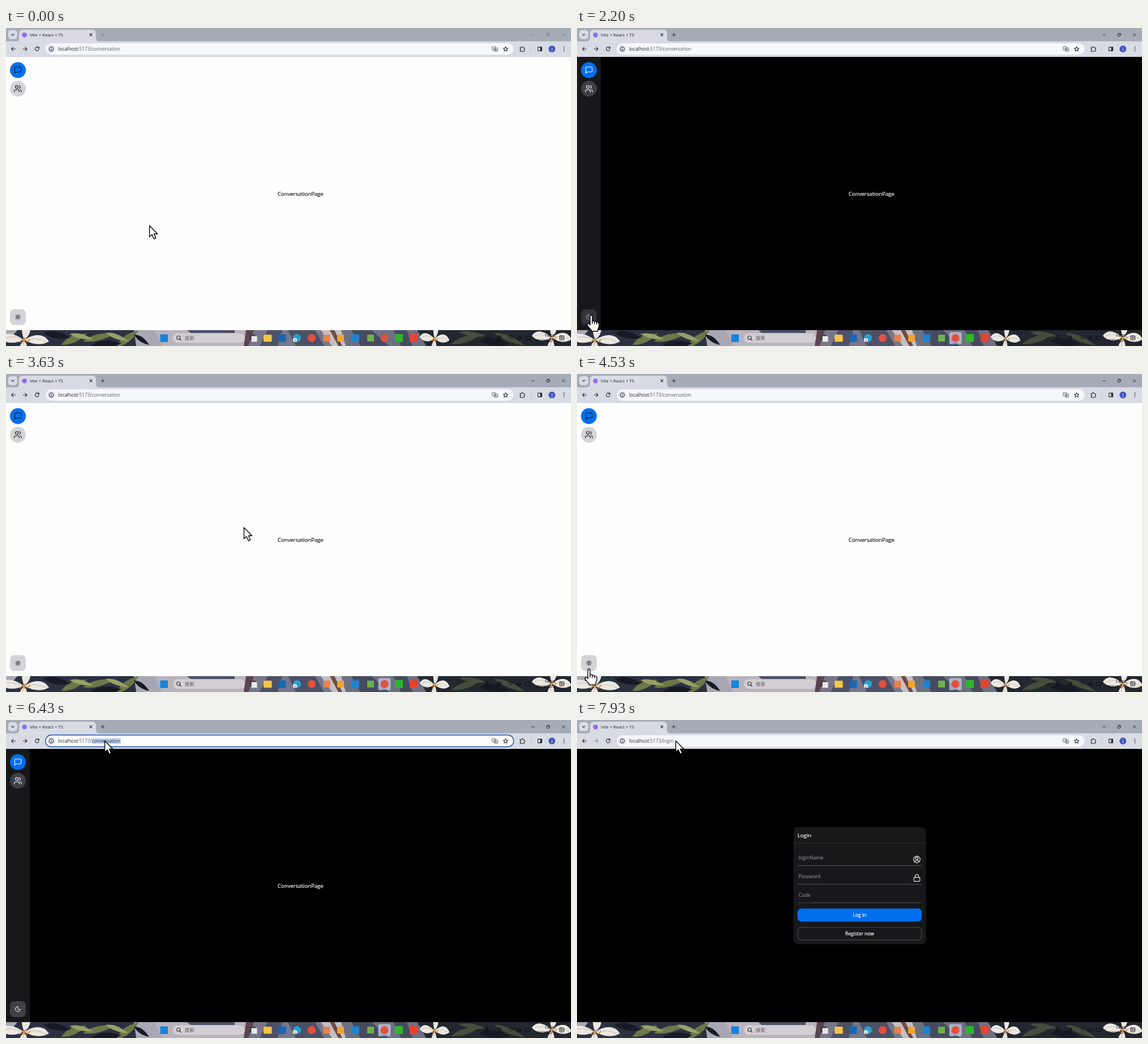
Write an HTML page that moves like this. It is 998 by 561 pixels and loops after 8 s.

```html
<!DOCTYPE html>
<html lang="en">
<head>
<meta charset="utf-8">
<title>Theme switch</title>
<style>
@property --btn { syntax: "<color>"; inherits: true; initial-value: #d4d4d8; }
@property --ico { syntax: "<color>"; inherits: true; initial-value: #11181c; }

html, body { margin: 0; width: 100%; height: 100%; overflow: hidden; }
#stage {
  position: relative; width: 998px; height: 561px; overflow: hidden; background: #000;
  --bg: #fefefe; --side: #fefefe; --menu: #fff; --fg: #11181c;
  animation: theme 8s step-end infinite, fade 8s linear infinite;
}
svg { position: absolute; left: 0; top: 0; overflow: visible; }
text, #url { font-family: "Open Sans", "Noto Sans", "Noto Sans CJK SC", sans-serif; }
.line { fill: none; stroke-linecap: round; stroke-linejoin: round; }
.s { animation: 8s step-end infinite; }
.ico { stroke: var(--ico); }
.fg { fill: var(--fg); }
.crisp text { stroke: currentColor; stroke-width: .2px; }
.crisp { color: var(--fg); }

/* 1% = 80 ms */
@keyframes theme {
  0%, 35.37% { --bg: #fefefe; --side: #fefefe; --menu: #fff; --fg: #11181c; }
  21.1%, 66.995% { --bg: #000; --side: #18181b; --menu: #18181b; --fg: #fff; }
}
@keyframes fade {
  0%, 21.1%, 38.5%, 66.995% { --btn: #d4d4d8; --ico: #11181c; }
  24.2%, 35.37%, 70.1%, 100% { --btn: #3f3f46; --ico: #fff; }
}
@keyframes moon {
  0%, 36.5% { opacity: 0; }
  22.2%, 35.37%, 68% { opacity: 1; }
}
@keyframes sun {
  0%, 36.5% { opacity: 1; }
  22.2%, 68% { opacity: 0; }
}
@keyframes press {
  0%, 23.5%, 37.5%, 69.5% { opacity: 1; transform: none; }
  14%, 27%, 58.5% { opacity: .73; transform: scale(.97); }
}
@keyframes menu {
  0%, 14.4% { opacity: 0; transform: scale(.85); }
  17%, 21.1% { opacity: 1; transform: none; }
  23.6%, 27.5% { opacity: 0; transform: scale(.85); }
  30%, 35.36% { opacity: 1; transform: none; }
  35.37% { opacity: .75; transform: scale(.935); }
  37.2%, 59% { opacity: 0; transform: scale(.85); }
  61.3%, 66.99% { opacity: 1; transform: none; }
  66.995% { opacity: .87; transform: scale(.972); }
  69.5%, 100% { opacity: 0; transform: scale(.85); }
}
@keyframes hover {
  0%, 25%, 45% { opacity: 0; transform: none; }
  17%, 32.3%, 62.5% { opacity: 1; transform: translateY(20px); }
  18.6%, 63.8% { opacity: 1; transform: none; }
}
@keyframes darkText {
  0%, 25%, 45% { color: var(--fg); }
  18.6%, 63.8% { color: var(--ico); }
}
@keyframes sysText {
  0%, 45% { color: var(--fg); }
  32.3% { color: var(--ico); }
}
@keyframes active { 0% { opacity: .35; } 4.15% { opacity: 1; } }
@keyframes late { 0% { visibility: hidden; } 4.15% { visibility: visible; } }
@keyframes early { 0% { visibility: visible; } 4.15% { visibility: hidden; } }
@keyframes focus { 0%, 96.62% { visibility: hidden; } 76% { visibility: visible; } }
@keyframes pick {
  0% { background-size: 0 10px; background-position: 0 5px; }
  76% { background-size: 110px 10px; background-position: 0 5px; }
  79.2% { background-size: 51px 10px; background-position: 59.6px 5px; }
  87.87% { background-size: 0 10px; background-position: 0 5px; }
}
@keyframes oldPath {
  0% { display: inline; color: #5b5e66; }
  76% { display: inline; color: #2b2e38; }
  87.87% { display: none; }
}
@keyframes typing {
  0% { width: 0; }
  87.87% { width: 2.4px; }
  88.6% { width: 7.3px; }
  89.4% { width: 11.9px; }
  90.1% { width: 14px; }
  91% { width: 22px; }
}
@keyframes drop { 0%, 96.62% { visibility: hidden; } 87.87% { visibility: visible; } }
@keyframes page { 0% { opacity: 1; } 97.5% { opacity: 0; } }
@keyframes login { 0% { opacity: 0; } 98.5% { opacity: 1; } }
@keyframes spin { 0%, 98.5% { visibility: hidden; } 96.62% { visibility: visible; } }
@keyframes mark { 0%, 98.5% { visibility: visible; } 96.62% { visibility: hidden; } }
@keyframes forward { 0% { opacity: 1; } 97.5% { opacity: .4; } }

@keyframes move {
  0%, .375% { transform: translate(253px, 348px); }
  1.625%, 4.125% { transform: translate(223px, 371px); }
  9% { transform: translate(110px, 455px); }
  13% { transform: translate(24px, 508px); }
  14.5% { transform: translate(25px, 512px); }
  17.5% { transform: translate(34px, 480px); }
  19.4%, 21.25% { transform: translate(39.5px, 457.5px); }
  24.5% { transform: translate(24px, 506px); }
  28% { transform: translate(25px, 506px); }
  33%, 36% { transform: translate(40.5px, 476.5px); }
  41% { transform: translate(300px, 330px); }
  45.5% { transform: translate(420px, 270px); }
  51% { transform: translate(180px, 400px); }
  55.75% { transform: translate(17px, 492px); }
  56.625% { transform: translate(21px, 519.5px); }
  59.3% { transform: translate(22px, 523px); }
  64.5% { transform: translate(41px, 456px); }
  66.25%, 67.5% { transform: translate(43.7px, 450px); }
  72.5% { transform: translate(190px, 60px); }
  74.5% { transform: translate(196px, 6px); }
  76.6%, 77.8% { transform: translate(178px, 27px); }
  80.3%, 100% { transform: translate(174px, 36px); }
}
@keyframes hand {
  0%, 36.4%, 67.8% { visibility: hidden; }
  12.7%, 56.4% { visibility: visible; }
}
@keyframes arrow {
  0%, 36.4%, 67.8% { visibility: visible; }
  12.7%, 56.4% { visibility: hidden; }
}

#pop { transform-origin: 65.5px 492px; animation: menu 8s linear infinite; filter: drop-shadow(0 0 4px #0001); }
#pop .s { fill: currentColor; }
#theme { transform-box: fill-box; transform-origin: center; }
#url {
  position: absolute; left: 92px; top: 26.6px; height: 20px; line-height: 20px; width: 300px;
  font-size: 8.38px; color: #5b5e66; white-space: nowrap;
  background: linear-gradient(#c4d6f8, #c4d6f8) no-repeat 0 5px / 0 10px;
}
#url b { font-weight: 400; color: #1f2024; }
#typed { display: inline-block; overflow: hidden; vertical-align: top; height: 20px; }
#cur { animation: move 8s ease-in-out infinite; }
</style>
</head>
<body>
<div id="stage">
<svg width="998" height="561" viewBox="0 0 998 561">
  <defs>
    <clipPath id="bar"><path d="M0 533h998v28H0z"/></clipPath>
    <path id="leaf" d="M0 0Q20-15 54 0Q24 12 0 0z"/>
    <g id="lily">
      <path fill="#ece8e0" d="M0 0Q-30-20-44-3Q-26 12 0 0zM0 0Q-18 22-6 30Q14 22 0 0zM0 0Q30-18 44 3Q24 14 0 0zM0 0Q-10-26 6-30Q18-14 0 0z"/>
      <path class="line" stroke="#b4aca8" stroke-width=".8" d="M0 0Q-22-9-38-3M0 0Q20-5 38 3M0 0Q-4 14-3 24"/>
      <path class="line" stroke="#d98a34" stroke-width="2" d="M-7 4l4-5M0 5l1-8M5 4l5-4"/>
    </g>
  </defs>

  <!-- page -->
  <g class="s" style="animation-name:page">
    <path style="fill:var(--bg)" d="M0 51h998v482H0z"/>
    <path style="fill:var(--side)" d="M0 51h42v482H0z"/>
    <circle cx="21" cy="74.3" r="14" fill="#006fee"/>
    <circle cx="21" cy="107.2" r="14" style="fill:var(--btn)"/>
    <path class="line ico" stroke-width="1.8" transform="translate(13.6 66.9) scale(.62)" d="M21 15a2 2 0 0 1-2 2H7l-4 4V5a2 2 0 0 1 2-2h14a2 2 0 0 1 2 2z"/>
    <path class="line ico" stroke-width="1.8" transform="translate(13.5 99.7) scale(.62)" d="M16 21v-2a4 4 0 0 0-4-4H6a4 4 0 0 0-4 4v2M5 7a4 4 0 1 0 8 0a4 4 0 1 0-8 0M22 21v-2a4 4 0 0 0-3-3.87M16 3.13a4 4 0 0 1 0 7.75"/>
    <g class="crisp"><text class="fg" x="479.7" y="296" font-size="9.6">ConversationPage</text></g>

    <g id="theme" class="s" style="animation-name:press">
      <rect x="7" y="496" width="28" height="28" rx="7.5" style="fill:var(--btn)"/>
      <g class="line ico s" stroke-width="1.1" style="animation-name:sun">
        <circle cx="21" cy="510" r="2.1"/>
        <path d="M21 505.2v.5M21 514.3v.5M16.2 510h.5M25.3 510h.5M17.6 506.6l.4.4M24 513l.4.4M17.6 513.4l.4-.4M24 507l.4-.4"/>
      </g>
      <path class="line ico s" style="animation-name:moon" stroke-width="2" transform="translate(15 504) scale(.5)" d="M12 3a6 6 0 0 0 9 9 9 9 0 1 1-9-9z"/>
    </g>

    <g id="pop" class="crisp" font-size="8.5">
      <rect x="7" y="425" width="117" height="67" rx="7.5" style="fill:var(--menu)"/>
      <rect class="s" x="11.7" y="449" width="107.6" height="19" rx="4.5" style="fill:var(--btn);animation-name:hover"/>
      <text class="fg" x="16.3" y="441.7">Light</text>
      <text class="s" x="16.3" y="461.6" style="animation-name:darkText">Dark</text>
      <text class="s" x="16.3" y="481.6" style="animation-name:sysText">System</text>
    </g>
  </g>

  <!-- login card -->
  <g class="s" style="animation-name:login" font-size="8.5">
    <rect x="382.5" y="189" width="234" height="206.5" rx="7.5" fill="#18181b"/>
    <path fill="#2e2e32" d="M382.5 216.8h234v1h-234z"/>
    <g class="crisp"><text class="fg" x="389.4" y="206.6" font-size="9.7">Login</text></g>
    <g fill="#a1a1aa" font-size="8.6">
      <text x="391.4" y="246.1">loginName</text>
      <text x="391.4" y="278.9">Password</text>
      <text x="391.4" y="311.7">Code</text>
    </g>
    <path stroke="#3f3f46" stroke-width="1.4" d="M389.5 256.8h219.5M389.5 289.7h219.5M389.5 322.4h219.5"/>
    <g class="line" stroke="#ecedee" stroke-width="1.2">
      <circle cx="600.3" cy="246" r="5.8"/><circle cx="600.3" cy="244.4" r="2.2"/>
      <path d="M596.4 250q.6-2 2.6-2h2.6q2 0 2.6 2"/>
      <rect x="595" y="277.6" width="10.6" height="7" rx="1.5"/>
      <path d="M597.4 277.4v-2a2.9 2.9 0 0 1 5.8 0v2"/>
    </g>
    <rect x="389.5" y="332.5" width="219.5" height="23.3" rx="7" fill="#006fee"/>
    <rect x="390.1" y="365.6" width="218.4" height="22.4" rx="6.5" fill="none" stroke="#3f3f46" stroke-width="1.3"/>
    <g class="crisp" text-anchor="middle">
      <text class="fg" x="499.2" y="347.2">Log in</text>
      <text class="fg" x="499.2" y="379.9">Register now</text>
    </g>
  </g>

  <!-- browser frame -->
  <path fill="#a6abb8" d="M0 0h998v24H0z"/>
  <path fill="#d8dbe3" d="M0 23.5h17q6 0 6-6V10q0-7 7-7h122q7 0 7 7v7.5q0 6 6 6H998V51H0z"/>
  <path fill="#c9ccd5" d="M0 50.2h998v.8H0z"/>
  <rect x="3.8" y="3.8" width="16" height="16" rx="5" fill="#d8dbe3"/>
  <path class="line" stroke="#303238" stroke-width="1.1" d="M9.7 11l2.1 2.1 2.1-2.1M148 10l3.8 3.8M151.8 10l-3.8 3.8"/>
  <circle class="s" style="animation-name:mark" cx="32.6" cy="12.3" r="4.2" fill="#8f6cf2"/>
  <path class="line s" style="animation-name:spin" stroke="#2c62c8" stroke-width="1.2" d="M32.6 8.3a4 4 0 1 1-4 4"/>
  <text x="42" y="14.9" font-size="7.75" fill="#26282d">Vite + React + TS</text>
  <g class="line s" style="animation-name:active" stroke="#26282d" stroke-width=".9">
    <path d="M168 12h5.8M170.9 9.1v5.8M928.5 12h5M982.3 9.6l4.6 4.6M986.9 9.6l-4.6 4.6"/>
    <rect x="955" y="10.6" width="4" height="4" rx=".8"/><path d="M956.5 9.3h3q.9 0 .9.9v3"/>
  </g>

  <rect x="70" y="27" width="826.5" height="20" rx="10" fill="#f5f7fb"/>
  <rect class="s" style="animation-name:focus" x="69.7" y="26.5" width="827" height="20.7" rx="10.3" fill="#fdfdfe" stroke="#1c4fae" stroke-width="1.4"/>
  <g class="s" style="animation-name:drop" font-size="8">
    <rect x="66" y="21.5" width="835.5" height="126" rx="9" fill="#fff" stroke="#c4c7cf" stroke-width=".8"/>
    <path fill="#e4e8f0" d="M66 52h835v22H66z"/>
    <g class="line" stroke="#5f636b" stroke-width=".9">
      <circle cx="80" cy="63" r="3.6"/><circle cx="80" cy="86" r="3.6"/><circle cx="80" cy="109" r="3.6"/><circle cx="80" cy="132" r="3.6"/>
      <path d="M76.5 63h7M76.5 86h7M76.5 109h7M76.5 132h7"/>
    </g>
    <g fill="#2558b5">
      <text x="92" y="66">localhost:5173/login</text>
      <text x="92" y="89">localhost:5173</text>
      <text x="92" y="112">localhost:5173/user</text>
      <text x="92" y="135">localhost:5173/conversation</text>
    </g>
  </g>
  <circle cx="80" cy="37" r="7" fill="#e3e6ee"/>
  <g class="line" stroke="#2b2d33" stroke-width="1.1">
    <path d="M16.5 37H9.8M12.8 33.9L9.7 37l3.1 3.1"/>
    <path class="s" style="animation-name:forward" d="M30.3 37H37M34 33.9l3.1 3.1-3.1 3.1"/>
    <path d="M58 35.1a3.4 3.4 0 1 0 .3 2.6M58.3 33.3v2.3H56"/>
    <circle cx="80" cy="37" r="3.7"/><path d="M80 36.7v2M80 35v.1"/>
    <path d="M882.5 32.9l1.2 2.7 2.9.3-2.2 1.9.7 2.9-2.6-1.5-2.6 1.5.7-2.9-2.2-1.9 2.9-.3z"/>
    <path d="M908.2 34.2h2.2a1.3 1.3 0 1 1 2.6 0h2.2v2.2a1.3 1.3 0 1 1 0 2.6v2.2h-7v-2.2a1.3 1.3 0 0 0 0-2.6z"/>
    <rect x="939.5" y="33.6" width="7" height="6.8" rx=".8"/>
  </g>
  <path fill="#2b2d33" d="M943.5 33.5h3v7h-3z"/>
  <g fill="none" stroke="#55585f" stroke-width=".9"><rect x="858.7" y="32.8" width="6" height="6.2" rx=".8"/><rect x="863" y="35.2" width="5.6" height="6" rx=".8"/></g>
  <path stroke="#55585f" stroke-width=".8" d="M860.2 36h3M864.5 38.6h2.8M865.9 37v3"/>
  <path fill="#b7c4dd" d="M926.9 32.5h1v9h-1z"/>
  <circle cx="964.3" cy="37" r="6" fill="#4558bd"/>
  <text x="964.3" y="39.4" font-size="7" fill="#fff" text-anchor="middle">j</text>
  <g fill="#2b2d33"><circle cx="985.5" cy="33.7" r=".9"/><circle cx="985.5" cy="37" r=".9"/><circle cx="985.5" cy="40.3" r=".9"/></g>

  <!-- taskbar -->
  <g clip-path="url(#bar)">
    <path fill="#2c3142" d="M0 533h998v28H0z"/>
    <path fill="#23272f" d="M730 533h268v28H744z"/>
    <path fill="#a9a6b4" d="M226 533h44l12 28h-52zM0 533h20l-8 10H0z"/>
    <path fill="#b9b3be" d="M262 533h168l-8 28H276z"/>
    <path fill="#77768a" d="M426 533h166l-8 28H420z"/>
    <path fill="#4c5166" d="M320 533h84v5h-78zM448 561l14-28h26l-8 28zM498 533h48l16 28h-50z"/>
    <path fill="#5c4450" d="M424 533h14l-10 28h-8z"/>
    <path fill="#c4bfc6" d="M556 533h38l10 28h-28z"/>
    <path fill="#6d7083" d="M592 533h134l16 28H600z"/>
    <path fill="#6f4c43" d="M572 533h8l14 28h-7z"/>
    <path fill="#464b60" d="M610 533h36l30 28h-50zM684 533h24l10 28h-20z"/>
    <g fill="#6d7848">
      <use href="#leaf" transform="translate(98 559) rotate(-24) scale(.9)"/>
      <use href="#leaf" transform="translate(136 553) rotate(-14) scale(1.1 .8)"/>
      <use href="#leaf" transform="translate(196 563) rotate(-38) scale(.9)"/>
    </g>
    <g fill="#98a068">
      <use href="#leaf" transform="translate(112 540) rotate(12) scale(.8 .6)"/>
      <use href="#leaf" transform="translate(176 538) rotate(20) scale(.8 .6)"/>
    </g>
    <g fill="#454d3c">
      <use href="#leaf" transform="translate(786 558) rotate(-18) scale(1.1 .8)"/>
      <use href="#leaf" transform="translate(862 538) rotate(22) scale(1.1 .7)"/>
      <use href="#leaf" transform="translate(800 537) rotate(8) scale(.9 .6)"/>
    </g>
    <g fill="#171a24">
      <use href="#leaf" transform="translate(66 538) rotate(10) scale(.9)"/>
      <use href="#leaf" transform="translate(150 561) rotate(-5)"/>
      <use href="#leaf" transform="translate(226 541) rotate(34) scale(.6)"/>
      <use href="#leaf" transform="translate(836 552) rotate(6)"/>
    </g>
    <use href="#lily" x="32" y="550"/>
    <use href="#lily" transform="translate(757 548) scale(.6 .9)"/>
    <use href="#lily" transform="translate(964 546) scale(.8 1)"/>
  </g>

  <rect x="295" y="538.5" width="127" height="17" rx="8.5" fill="#d3ced4"/>
  <g class="line" stroke="#2a2b30" stroke-width="1.1"><circle cx="304.7" cy="546.2" r="3"/><path d="M306.9 548.5l2.4 2.5"/></g>
  <text x="315.5" y="550.2" font-size="8.5" fill="#5c5a60">搜索</text>

  <rect class="s" style="animation-name:late" x="657.5" y="536.5" width="22" height="21.5" rx="3" fill="#c3cbe0" fill-opacity=".75"/>
  <rect x="272.5" y="540.5" width="13.5" height="13.5" fill="#1583dc"/>
  <rect x="430.5" y="541" width="10" height="10" fill="#3a3b41"/><rect x="433.5" y="543.5" width="10" height="10" fill="#e8e8ea"/>
  <rect x="455" y="541" width="14.5" height="12.5" rx="1.5" fill="#f6c445"/>
  <rect x="481.5" y="540.5" width="13" height="13.5" rx="1.5" fill="#1668b8"/>
  <circle cx="514" cy="547" r="7" fill="#2a9fd0"/>
  <circle cx="510.5" cy="550.5" r="3.6" fill="#f0f0f2"/>
  <text x="510.5" y="552.8" font-size="6" fill="#222" text-anchor="middle">2</text>
  <circle cx="540" cy="547" r="7" fill="#e2503f"/>
  <rect x="560.5" y="541" width="12" height="12" fill="#e9824a"/>
  <rect x="585" y="541" width="12" height="12" fill="#f0a52e"/>
  <rect x="611" y="540.5" width="13" height="13" fill="#1d83cf"/>
  <rect x="638" y="541" width="12" height="12" fill="#6fae4c"/>
  <circle cx="668.5" cy="547" r="7" fill="#e2503f"/>
  <rect x="687" y="540" width="14" height="14" fill="#2fb52c"/>
  <rect x="713" y="540" width="14" height="14" fill="#e8412f"/>
  <path class="s" style="animation-name:late" fill="#1f6fc9" d="M664 556.5h9v1.2h-9z"/>

  <g fill="#0c0d12" font-size="9">
    <text class="s" style="animation-name:early" x="844.5" y="550.4">中</text>
    <text class="s" style="animation-name:late" x="844.5" y="550.4">英</text>
    <text x="866.5" y="550.4">拼</text>
    <text x="970" y="544.5" font-size="7.3" text-anchor="end">14:26</text>
    <text x="970" y="554" font-size="7.3" text-anchor="end">2023/12/7</text>
  </g>
  <g class="line" stroke="#0c0d12" stroke-width="1">
    <path d="M828.5 548.5l2.5-2.5 2.5 2.5M888 545q4.500-4 9 0M890 547.500q2.500-2 5 0M892.500 550v.1M903 545.500h2l3-2.500v8l-3-2.500h-2zM910 545q1.500 2 0 4"/>
    <rect x="917" y="544" width="9" height="5.5" rx="1"/><rect x="978" y="543" width="7.5" height="7" rx="1"/>
    <path d="M980 545.5h3.5M980 547.5h3.5"/>
  </g>
</svg>

<div id="url" class="s" style="animation-name:pick"><b>localhost</b>:5173/<span class="s" style="animation-name:oldPath">conversation</span><span id="typed" class="s" style="animation-name:typing">login</span></div>

<svg width="998" height="561" viewBox="0 0 998 561">
  <g id="cur" fill="#fff" stroke="#000" stroke-width="1.4" stroke-linejoin="round">
    <path class="s" style="animation-name:arrow" d="M.5 .8V20.6L5 16.500L8.300 24L11.700 22.500L8.500 15.200H14.700Z"/>
    <g class="s" style="animation-name:hand">
      <path d="M-1.9 18V2.400Q-1.900 .7 0 .7Q2 .7 2 2.600V11Q4.300 9.800 6 12Q8.400 10.900 9.800 13.200Q13.600 12.600 14 16.500Q14.400 21 12.200 24.500L11.600 29H.6L.2 27Q-4 22.500 -6.800 18.600Q-7.600 16.200 -5.400 15.600Q-3.600 15.600 -1.900 18Z"/>
      <path fill="none" d="M2 11v5M6 12v4.500M9.800 13.200V17"/>
    </g>
  </g>
</svg>
</div>
</body>
</html>
```
